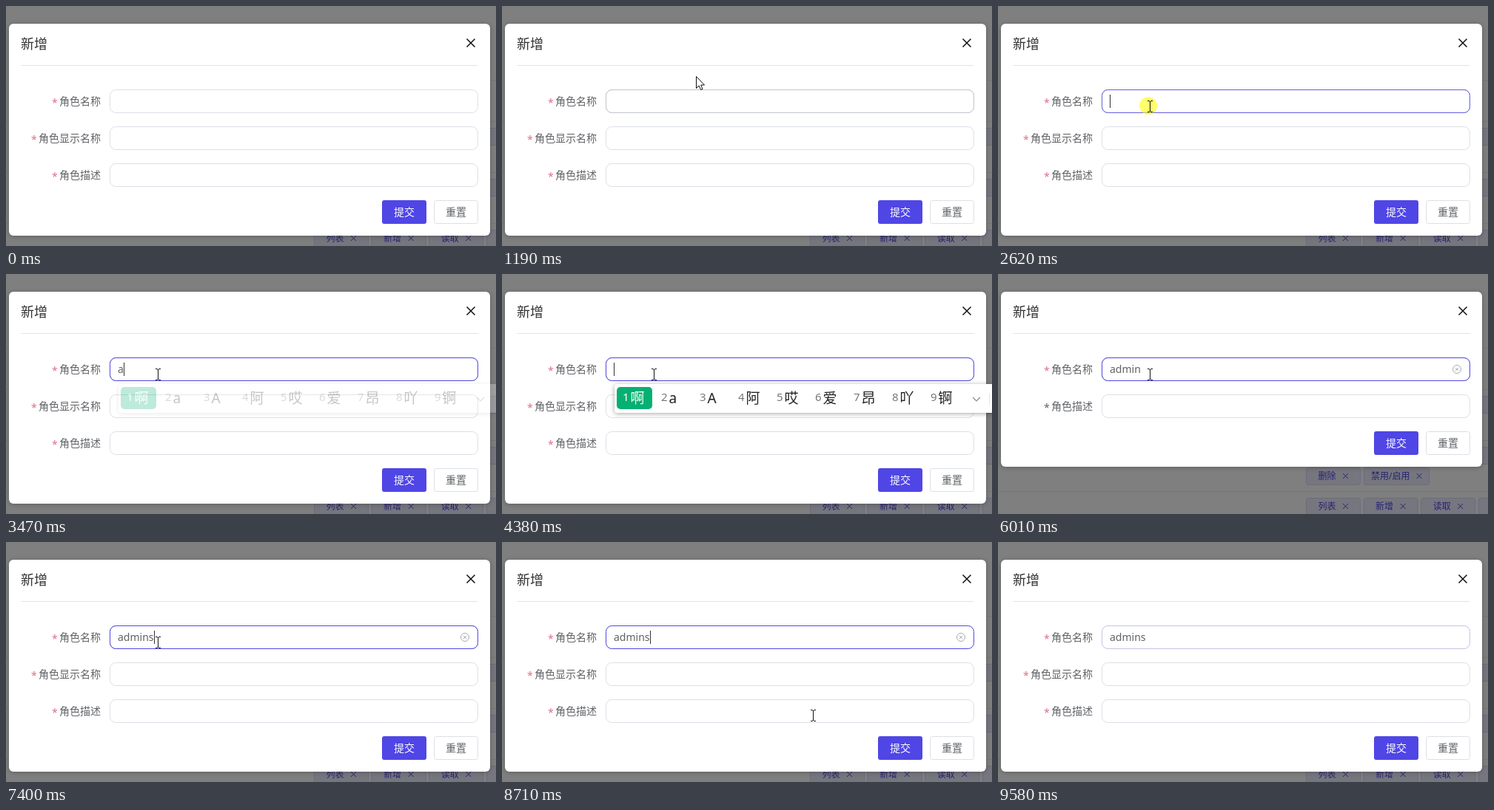
Write an HTML page that moves like this. It is 662x325 px and loops after 9.62 s.

```html
<!DOCTYPE html>
<html lang="zh-CN">
<head>
<meta charset="utf-8">
<title>新增</title>
<style>
  html, body { margin: 0; width: 100%; height: 100%; overflow: hidden; background: #7f7f7f; }
  svg { display: block; width: 100vw; height: 100vh; }
  text { font: 14px 'Noto Sans', 'Noto Sans CJK SC', 'Noto Sans CJK', sans-serif; fill: #606266; white-space: pre; }
  .title { font-size: 18px; fill: #303133; }
  .star { fill: #dc7088; }
  .plain .star { fill: #606266; }
  .tag rect { fill: #76767f; stroke: #6c6b7c; }
  .tag text { font-size: 12px; fill: #272372; }
  .tag path { stroke: #272372; fill: none; }
  .field { fill: #fff; stroke: #dcdfe6; }
  .ring { fill: none; }
  .submit { fill: #fff; font-weight: 500; }
  #ime text { font-size: 19px; fill: #222; }
  #ime .num { font-size: 15px; fill: #777; }
  #ime .chosen text { fill: #fff; }
  #dialog { filter: drop-shadow(0 1px 3px rgba(0, 0, 0, .25)); }
  #ime { filter: drop-shadow(0 1px 3px rgba(0, 0, 0, .35)); }
</style>
</head>
<body>
<svg viewBox="0 0 662 325">
  <g id="page"></g>
  <rect id="dialog" x="4" y="24" width="650" height="287" rx="6" fill="#fff"/>
  <text class="title" x="20" y="58">新增</text>
  <path d="M622.5 44.5l11 11m0-11l-11 11" stroke="#111" stroke-width="1.5"/>
  <path d="M20 80.5H638" stroke="#e0e3ec"/>
  <g id="row1"></g>
  <g id="row2"></g>
  <g id="lower">
    <g id="row3"></g>
    <rect x="508" y="263" width="60" height="32" rx="3" fill="#4f46e5"/>
    <text class="submit" x="524" y="284">提交</text>
    <rect class="field" x="578.5" y="263.5" width="59" height="31" rx="3"/>
    <text x="594" y="284">重置</text>
  </g>
  <rect id="hover" class="ring" x="140.5" y="113.5" width="497" height="31" rx="8" stroke="#c0c4cc"/>
  <rect id="focus" class="ring" x="140.5" y="113.5" width="497" height="31" rx="8" stroke="#4f46e5"/>
  <text id="value" x="151" y="134"></text>
  <rect id="caret" y="120" width="1" height="18" fill="#333"/>
  <path id="clear" d="M614.5 129a5.5 5.5 0 1 0 11 0a5.5 5.5 0 1 0-11 0M618 127l4 4m0-4l-4 4" fill="none" stroke="#a8abb2"/>
  <g id="ime">
    <rect x="152" y="149" width="530" height="39" rx="4" fill="#fff"/>
    <g id="candidates"></g>
    <path d="M636 167l5 5 5-5" fill="none" stroke="#888" stroke-width="1.2"/>
    <path d="M658.5 162v15" stroke="#e4e4e4"/>
  </g>
  <circle id="click" cx="203" cy="135" r="12" fill="#ff0"/>
  <path id="arrow" d="M.5 .5V16.5L4.2 13 6.6 18.5 9 17.5 6.7 12H11.5Z" fill="#fff" stroke="#111"/>
  <path id="beam" d="M-3 -7.5H-1L.5 -6.5 2 -7.5H4M.5 -7V7M-3 7.5H-1L.5 6.5 2 7.5H4" fill="none" stroke="#111"/>
</svg>
<script>
const LOOP = 9620;
const el = Object.fromEntries([...document.querySelectorAll('[id]')].map(e => [e.id, e]));

const tag = (x, y, w, label, dx = 16.5) => `<g class="tag" transform="translate(${x} ${y})">
  <rect x=".5" y=".5" width="${w - 1}" height="23" rx="3"/>
  <text x="${dx}" y="15.5">${label}</text>
  <path d="M${w - dx - 7.5} 8l7 7m0-7l-7 7"/></g>`;

const row = (label, y) => `<text class="star" x="${118 - label.length * 14}" y="${y + 23}">*</text>
  <text x="128" y="${y + 21}" text-anchor="end">${label}</text>
  <rect class="field" x="140.5" y="${y + .5}" width="497" height="31" rx="8"/>`;

el.page.innerHTML = '<rect width="662" height="325" fill="#7f7f7f"/>' +
  [100, 156, 225, 294].map(y => `<path d="M0 ${y}.5H662" stroke="#757679"/>`).join('') +
  tag(649, 165, 74, '') + tag(649, 234, 74, '') +
  tag(416, 262, 74, '删除') + tag(494, 262, 89, '禁用/启用', 10) +
  ['列表', '新增', '读取', '删除'].map((s, i) => tag(416 + i * 77.6, 303, 74, s)).join('');
el.row1.innerHTML = row('角色名称', 113);
el.row2.innerHTML = row('角色显示名称', 163);
el.row3.innerHTML = row('角色描述', 213);

const candidateList = (words, pitch) =>
  `<rect x="155" y="153" width="${pitch - 4}" height="30" rx="5" fill="#06b072"/>` +
  words.map((word, i) => `<g class="${i ? '' : 'chosen'}" transform="translate(${163 + i * pitch} 0)">
    <text class="num" y="172">${i + 1}</text><text x="10.5" y="175">${word}</text></g>`).join('');
const forA = candidateList([...'啊aA阿哎爱昂吖锕'], 52);
const forAd = candidateList(['阿大', '爱的', '啊的', '阿弟', '挨打', '爱戴'], 72);

// [time, text] after each key press
const typing = [[0, ''], [3450, 'a'], [4090, 'ad'], [4260, 'a'], [4380, ''], [4930, 'a'],
  [5110, 'ad'], [5230, 'adm'], [5340, 'admi'], [5500, 'admin'], [6380, 'admins']];
// [time, x, y] of the pointer
const path = [[490, 562, 324], [640, 545, 300], [800, 455, 215], [950, 350, 140], [1080, 285, 106],
  [1190, 262, 95], [1300, 238, 91], [1440, 227, 97], [1600, 214, 120], [1780, 205, 136],
  [8210, 205, 136], [8400, 245, 150], [8650, 380, 215], [8850, 510, 280], [9040, 586, 326]];

const ramp = (t, start, length) => Math.min(1, Math.max(0, (t - start) / length));
const within = (t, a, b) => t >= a && t < b;
const show = (node, on) => node.setAttribute('visibility', on ? 'visible' : 'hidden');
const fade = (node, opacity) => node.setAttribute('opacity', opacity);

function pointer(t) {
  const i = Math.max(1, path.findIndex(p => p[0] > t));
  const [t0, x0, y0] = path[i - 1], [t1, x1, y1] = path[i];
  const k = (t - t0) / (t1 - t0);
  return [Math.round(x0 + (x1 - x0) * k), Math.round(y0 + (y1 - y0) * k)];
}

function drawPointer(t) {
  const visible = within(t, 490, 9040);
  const [x, y] = visible ? pointer(t) : [0, 0];
  const overField = y >= 113 && y < 245 && (y - 113) % 50 < 32;
  show(el.arrow, visible && !overField);
  show(el.beam, visible && overField);
  for (const node of [el.arrow, el.beam]) node.setAttribute('transform', `translate(${x} ${y})`);
  fade(el.click, .58 * (ramp(t, 2200, 120) - ramp(t, 2640, 120)));
}

function drawInput(t) {
  const [keyTime, text] = typing.findLast(k => k[0] <= t);
  if (el.value.textContent !== text) el.value.textContent = text;
  const caretX = 151 + (text ? el.value.getComputedTextLength() : 0);
  el.caret.setAttribute('x', Math.round(caretX));
  const composing = within(t, 3450, 4930);
  const blinkOn = Math.floor((t - (keyTime || 2185)) / 510) % 2 === 0;
  show(el.caret, within(t, 2240, 9270) && (composing || blinkOn));
  show(el.clear, within(t, 4930, 9270));
  fade(el.hover, ramp(t, 950, 180) - ramp(t, 1190, 200) + ramp(t, 1560, 200) - ramp(t, 8300, 200));
  fade(el.focus, ramp(t, 2470, 190) - ramp(t, 9250, 400));
}

function drawIme(t) {
  show(el.ime, within(t, 3450, 4480));
  fade(el.ime, ramp(t, 3420, 200));
  const list = within(t, 4090, 4260) ? forAd : forA;
  if (el.candidates.list !== list) el.candidates.innerHTML = el.candidates.list = list;
}

function drawDialog(t) {
  const compact = within(t, 5500, 6380);
  el.dialog.setAttribute('height', compact ? 237 : 287);
  el.lower.setAttribute('transform', `translate(0 ${compact ? -50 : 0})`);
  el.lower.classList.toggle('plain', compact);
  show(el.row2, !compact);
}

const start = performance.now();
function frame() {
  const t = (performance.now() - start) % LOOP;
  drawDialog(t);
  drawInput(t);
  drawIme(t);
  drawPointer(t);
  requestAnimationFrame(frame);
}
frame();
</script>
</body>
</html>
```
